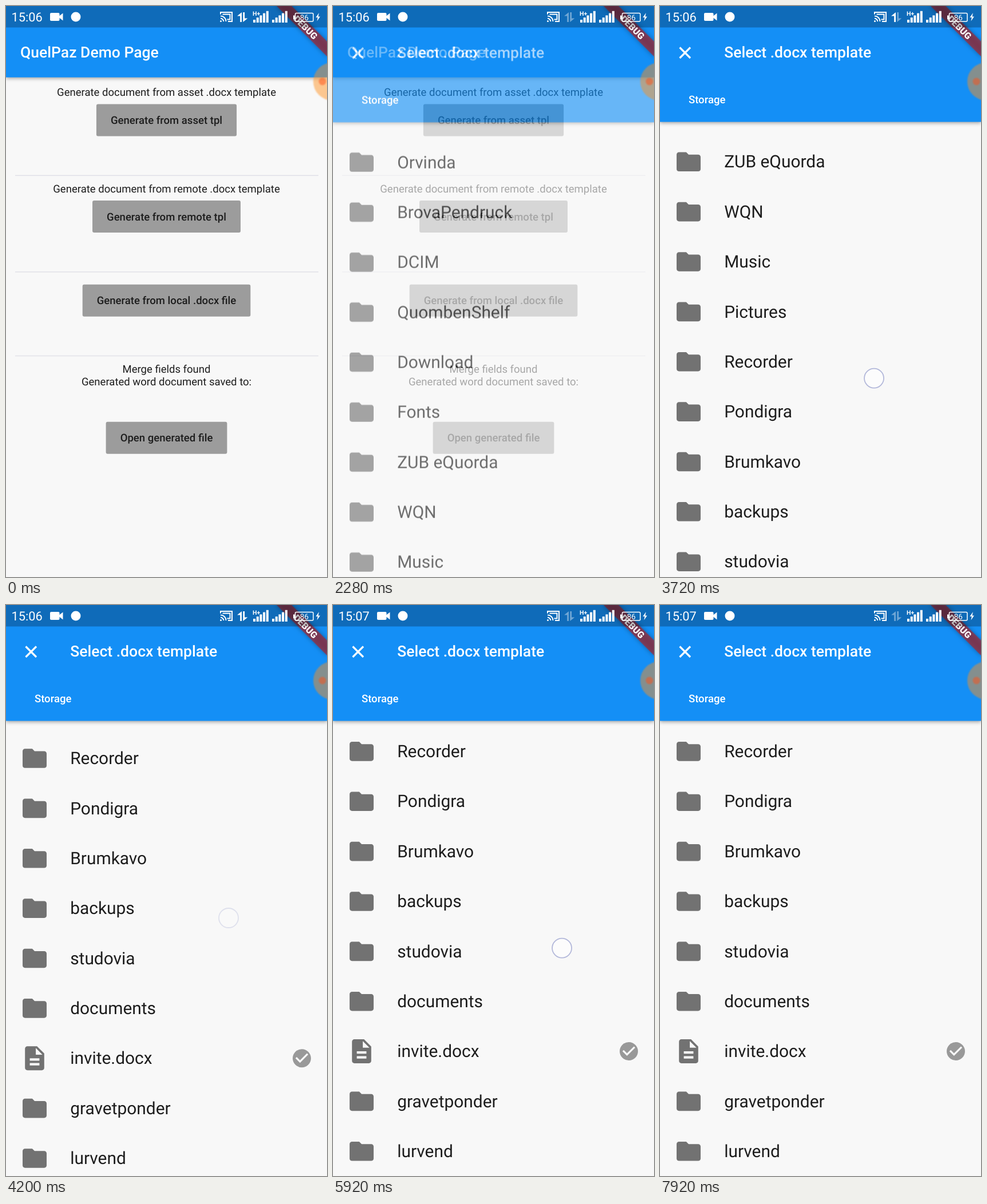
An HTML page for the animation above (8000 ms loop, 561 by 998 pixels).

```html
<!DOCTYPE html>
<html lang="en">
<head>
<meta charset="utf-8">
<title>Template picker</title>
<style>
html, body { margin: 0; width: 100%; height: 100%; overflow: hidden; background: #f8f8f8; }
svg { display: block; width: 561px; height: 998px; font-family: Roboto, sans-serif; text-rendering: geometricPrecision; }
.page { fill: #f8f8f8; }
.label { font-size: 18.54px; fill: #1d1d1d; text-anchor: middle; }
.medium { font-weight: 500; }
.title { font-size: 26.5px; font-weight: 500; fill: #fff; }
.item { font-size: 29.9px; fill: #1d1d1d; }
.bar { fill: #148ff6; filter: drop-shadow(0 2px 3px rgba(0, 0, 0, .35)); }
</style>
</head>
<body>
<svg viewBox="0 0 561 998">
  <defs>
    <path id="folder" d="M10 4H4c-1.1 0-2 .9-2 2v12c0 1.1.9 2 2 2h16c1.1 0 2-.9 2-2V8c0-1.1-.9-2-2-2h-8z"/>
    <path id="file" d="M14 2H6c-1.1 0-2 .9-2 2v16c0 1.1.9 2 2 2h12c1.1 0 2-.9 2-2V8zm2 16H8v-2h8zm0-4H8v-2h8zm-3-5V3.5L18.5 9z"/>
    <path id="check" d="M12 2a10 10 0 1 0 0 20 10 10 0 0 0 0-20zm-2 15l-5-5 1.4-1.4 3.6 3.6 7.6-7.6L19 8z"/>
  </defs>

  <g id="home">
    <rect class="page" width="561" height="998"/>
    <rect class="bar" y="-10" width="561" height="134.7"/>
    <text class="title" x="25" y="90.4">QuelPaz Demo Page</text>
  </g>

  <g id="picker">
    <rect class="page" width="561" height="998"/>
    <g id="list"></g>
    <rect class="bar" y="-10" width="561" height="212.6"/>
    <path d="M34.5 72.5l18.5 18.5m0-18.5l-18.5 18.5" stroke="#fff" stroke-width="3.2"/>
    <text class="title" x="112.2" y="90.4">Select .docx template</text>
    <text class="label medium" x="50" y="170" style="fill:#fff;text-anchor:start">Storage</text>
  </g>

  <g transform="translate(561 0) rotate(45)">
    <rect x="-62.3" y="43.6" width="124.6" height="18.7" fill="#b71c1c" fill-opacity=".63"
      style="filter:drop-shadow(0 0 4px rgba(0,0,0,.5))"/>
    <text y="58.6" font-size="15.9" font-weight="900" fill="#fff" text-anchor="middle">DEBUG</text>
  </g>

  <rect width="561" height="37.5" fill-opacity=".25"/>
  <g id="status" fill="#fff">
    <text id="clock" x="9.5" y="27" font-size="21.8"></text>
    <rect x="77" y="12" width="16.5" height="14" rx="2"/>
    <path d="M93 17.5l6.5-5v13l-6.5-5z"/>
    <circle cx="122" cy="19" r="8.5"/>
    <g fill="none" stroke="#fff" stroke-width="2">
      <path d="M375 14.5V11h20v16h-7M375 17.5a9.5 9.5 0 0 1 9.5 9.5M375 21.8a5.2 5.2 0 0 1 5.2 5.2"/>
      <path d="M378.5 14.5h13v9h-5"/>
    </g>
    <circle cx="375.5" cy="26.5" r="1.5"/>
    <path id="up" d="M412 11v17h-2.8V17.5H404z"/>
    <path id="down" d="M414.3 28V11h2.8v10.5h5.2z"/>
    <text x="431" y="16.5" font-size="10.5" font-weight="700">H+</text>
    <rect x="505.5" y="12.5" width="31.5" height="14.5" rx="2" fill="none" stroke="#fff" stroke-width="1.5"/>
    <rect x="502" y="16.5" width="2.8" height="6.5"/>
    <text x="521.3" y="24.6" font-size="13.5" text-anchor="middle">86</text>
    <path d="M547 12l-5.5 8h3.3l-1.3 6.5 5.5-8h-3.3z"/>
  </g>

  <circle id="touch" r="17" fill="#fff" fill-opacity=".45" stroke="#b3b8da" stroke-width="1.8"/>

  <g style="filter:blur(.8px)">
    <circle cx="570" cy="132" r="33" fill="#ff911e" fill-opacity=".48"/>
    <circle cx="553" cy="132" r="6.5" fill="#ff5014" fill-opacity=".5"/>
  </g>
</svg>

<script>
const LOOP = 8000, ROW = 87.36, MID = 280.5;
const $ = id => document.getElementById(id);

function add(parent, tag, attrs, text) {
  const el = document.createElementNS('http://www.w3.org/2000/svg', tag);
  for (const key in attrs) el.setAttribute(key, attrs[key]);
  if (text) el.textContent = text;
  return parent.appendChild(el);
}

function icon(name, x, y, scale, fill) {
  add($('list'), 'use', { href: '#' + name, fill,
    transform: `translate(${x} ${y}) scale(${scale}) translate(-12 -12)` });
}

const caption = (y, text) => add($('home'), 'text', { class: 'label', x: MID, y }, text);

// A button is as wide as its text plus padding
function button(y, text) {
  const label = add($('home'), 'text', { class: 'label medium', x: MID, y: y + 34.5 }, text);
  const width = label.getComputedTextLength() + 50;
  const box = add($('home'), 'rect',
    { x: MID - width / 2, y, width, height: 56, rx: 3, fill: '#9c9c9c' });
  label.before(box);
}

function section(y, text, note) {
  if (note) caption(y - 14.3, note);
  button(y, text);
  add($('home'), 'path', { d: `M16 ${y + 124.7}H546`, stroke: '#e1e1e8', 'stroke-width': 1.4 });
}

section(171.5, 'Generate from asset tpl', 'Generate document from asset .docx template');
section(340, 'Generate from remote tpl', 'Generate document from remote .docx template');
section(486.8, 'Generate from local .docx file');
caption(641, 'Merge fields found');
caption(663, 'Generated word document saved to:');
button(726.8, 'Open generated file');

const names = ['Orvinda', 'BrovaPendruck', 'DCIM', 'QuombenShelf', 'Download', 'Fonts',
  'ZUB eQuorda', 'WQN', 'Music', 'Pictures', 'Recorder', 'Pondigra', 'Brumkavo', 'backups',
  'studovia', 'documents', 'invite.docx', 'gravetponder', 'lurvend'];

names.forEach((name, i) => {
  const y = 272.3 + i * ROW, isFile = name.endsWith('.docx');
  icon(isFile ? 'file' : 'folder', 50, y, 2.1, '#727272');
  add($('list'), 'text', { class: 'item', x: 112.2, y: y + 10.2 }, name);
  if (isFile) icon('check', 517, y, 1.6, '#999');
});

// Signal bars
for (const left of [432, 465]) {
  for (let i = 0; i < 5; i++) {
    const height = 5 + i * 3.8;
    add($('status'), 'rect', { x: left + i * 5.7, y: 29 - height, width: 4, height });
  }
}

const ramp = (t, from, to) => Math.min(1, Math.max(0, (t - from) / (to - from)));
const easeOut = p => 1 - (1 - p) ** 3;
const move = (id, x, y) => $(id).setAttribute('transform', `translate(${x} ${y})`);
const fade = (id, value) => $(id).setAttribute('opacity', value);

const swipes = [
  { start: 3120, x: 420, y: 510 },
  { start: 3720, x: 374, y: 651 },
  { start: 5920, x: 400, y: 600 }
];
const PRESS = 180, DRAG = 240, RELEASE = 380;
const MAX_SCROLL = 890, STOP = 6 * ROW;

function drawTouch(t) {
  const swipe = swipes.filter(s => t >= s.start - PRESS).pop();
  if (!swipe) return fade('touch', 0);
  const { start, x, y } = swipe, lift = start + DRAG;
  const p = ramp(t, start, lift);
  move('touch', x + 15 * p, y - 104 * p);
  fade('touch', ramp(t, start - PRESS, start) * (1 - ramp(t, lift, lift + RELEASE)));
}

function draw(now) {
  const t = now % LOOP;

  const open = ramp(t, 2040, 2320);
  move('picker', 0, 250 * (1 - easeOut(open)));
  fade('picker', open ** 3);

  const scroll = STOP * easeOut(ramp(t, 3120, 3700))
    + (MAX_SCROLL - STOP) * easeOut(ramp(t, 3760, 4410));
  move('list', 0, -scroll);
  drawTouch(t);

  const onHome = t < 2280;
  fade('up', onHome || (t >= 3120 && t < 5000) ? 1 : .4);
  fade('down', onHome || (t >= 4000 && t < 5000) ? 1 : .4);
  $('clock').textContent = t < 5000 ? '15:06' : '15:07';
}

const began = performance.now();
function tick() {
  draw(performance.now() - began);
  requestAnimationFrame(tick);
}
tick();
</script>
</body>
</html>
```
